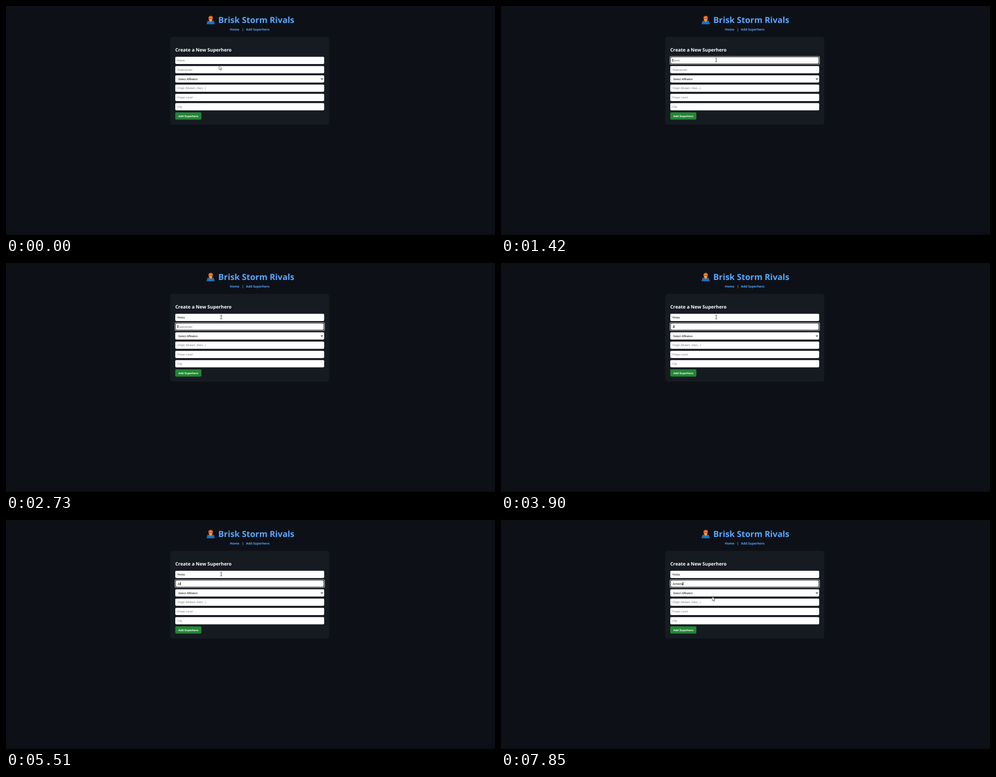
These frames come from a looping animation (1092 by 513 pixels, 8000 ms). An HTML page:

```html
<!DOCTYPE html>
<html lang="en">
<head>
<meta charset="utf-8">
<title>Superhero form</title>
<style>
  html, body { margin: 0; width: 100%; height: 100%; overflow: hidden; background: #0d1117; }
  svg { display: block; width: 1092px; height: 513px; text-rendering: geometricPrecision; }
  .ui { font-family: "Open Sans", "Noto Sans", sans-serif; font-weight: 700; fill: #58a6ff; }
  .form { font: 6.2px "Liberation Sans", Arial, sans-serif; }
  .light { fill: #fff; }
</style>
</head>
<body>
<svg id="stage" viewBox="0 0 1092 513">
  <rect width="1092" height="513" fill="#0d1117"/>
  <rect y="509.5" width="1092" height="3.5" fill="#0a0d12"/>

  <g id="hero">
    <path d="M450 33H464L466 41H448Z" fill="#c8372d"/>
    <path d="M448.3 41Q448 34.5 454 33.4H460Q466 34.5 465.8 41Z" fill="#1673c7"/>
    <path d="M451 41V38M463 41V38" stroke="#0b4f94" stroke-width=".7"/>
    <path d="M454.5 32H459.7V34L457.1 36.3L454.5 34Z" fill="#e08a3c"/>
    <ellipse cx="457" cy="28.3" rx="4.4" ry="5.2" fill="#f9a84b"/>
    <path d="M452.2 28.5Q451.3 22 457.4 22Q463 22.2 461.9 28.5Q460.5 25.6 457.5 25.6Q453.4 25.5 452.2 28.5Z" fill="#e8671b"/>
    <path d="M452.8 27.3H461.3V28.8Q459 30.2 457 28.7Q455 30.2 452.8 28.8Z" fill="#b6452c"/>
  </g>

  <g class="ui">
    <text x="474" y="38.2" font-size="18.8">Brisk Storm Rivals</text>
    <g font-size="7.1">
      <text x="500" y="55.3">Home</text>
      <text x="527" y="55.3" class="light" font-weight="400">|</text>
      <text x="536" y="55.3">Add Superhero</text>
    </g>
  </g>

  <rect x="366.5" y="69" width="355.3" height="196.7" rx="6" fill="#161b22"/>
  <text class="ui light" x="378" y="101.5" font-size="10.4">Create a New Superhero</text>

  <g class="form">
    <g id="ring">
      <rect x="377" y="112.4" width="334.7" height="18.7" rx="3" fill="#fff"/>
      <rect x="378" y="113.3" width="332.7" height="16.9" rx="2.2" fill="#101010"/>
    </g>
    <g id="fields"></g>
    <path d="M703.4 162.2L705.5 164.4L707.6 162.2" fill="none" stroke="#000" stroke-width="1.1"/>
    <g id="spinner">
      <rect x="697" y="201" width="7" height="8" fill="#efefef"/>
      <path d="M699 204L700.5 202.3L702 204ZM699 206L700.5 207.7L702 206Z" fill="#505050"/>
    </g>
    <rect id="caret" width="1" height="7"/>
    <rect x="378" y="238.2" width="58.3" height="16.3" rx="2.4" fill="#238636"/>
    <text class="light" x="384.8" y="248.6" font-weight="700">Add Superhero</text>
  </g>

  <path id="arrow" d="M0 0V9.4L2.2 7.5L3.7 10.8L5.2 10.1L3.8 6.9H6.6Z" fill="#fff" stroke="#222" stroke-width=".7"/>
  <g id="beam" fill="none" stroke="#111">
    <path d="M-2 -4.2H-.6L0 -3.8L.6 -4.2H2M0 -3.8V3.8M-2 4.2H-.6L0 3.8L.6 4.2H2" stroke-width=".85"/>
    <circle id="click" r="5.8" stroke-width=".8"/>
  </g>
</svg>
<script>
const $ = id => document.getElementById(id);
const LOOP = 8000, TOP = 113.7, STEP = 20.75, LEFT = 383;
const hints = ['Name', 'Superpower', 'Select Affiliation', 'Origin (Mutant, Alien...)', 'Power Level', 'City'];
const NAME = 'Norpy';

function add(tag, attrs) {
  const el = document.createElementNS('http://www.w3.org/2000/svg', tag);
  for (const k in attrs) el.setAttribute(k, attrs[k]);
  return $('fields').appendChild(el);
}

const fields = hints.map((hint, i) => {
  const y = TOP + i * STEP;
  const box = add('rect', { x: 378, y, width: 332.5, height: 16.2, rx: 2.3, fill: '#fff' });
  const text = add('text', { x: i === 2 ? 384.6 : LEFT, y: y + 10.4 });
  return { box, text, y, hint };
});

// time, focused field, its text, caret visible
const typing = [
  [0, -1, '', 0], [380, 0, '', 1], [890, 0, '', 0], [1420, 0, '', 1],
  [1540, 0, 'No', 1], [1930, 0, 'Norp', 1], [2180, 0, NAME, 1],
  [2730, 1, '', 1], [3240, 1, '', 0], [3770, 1, '', 1],
  [3900, 1, 'J', 1], [4170, 1, 'Ju', 1], [4450, 1, 'Junp', 1], [4980, 1, 'Junp', 0],
  [5260, 1, 'Jun', 1], [5380, 1, 'Ju', 1], [5900, 1, 'Ju', 0],
  [6050, 1, 'Jum', 1], [6330, 1, 'Jump', 1], [6600, 1, 'Jumpi', 1], [6730, 1, 'Jumpin', 1],
  [6870, 1, 'Jumping', 1], [7400, 1, 'Jumping', 0], [7850, 1, 'Jumping', 1]
];

// time, pointer shape, x, y
const pointer = [
  [0, 'arrow', 475.7, 133.3], [250, 'beam', 482, 120], [380, 'click', 482, 120],
  [500, 'beam', 482, 120], [890, 'beam', 480.5, 121.2], [7270, 'beam', 480.3, 122.5],
  [7400, 'beam', 479, 125], [7540, 'beam', 478.5, 204], [7700, 'beam', 476.8, 180],
  [7850, 'arrow', 471.8, 171.5]
];

const at = (list, t) => list.findLast(s => s[0] <= t);
const show = (el, on) => el.setAttribute('visibility', on ? 'visible' : 'hidden');
const move = (el, x, y) => el.setAttribute('transform', `translate(${x} ${y})`);

function draw(now) {
  const t = now % LOOP;
  const [, focus, typed, caretOn] = at(typing, t);
  const [, shape, px, py] = at(pointer, t);

  fields.forEach((f, i) => {
    const on = i === focus, inset = on ? 1.2 : 0;
    const value = on ? typed : i === 0 && focus === 1 ? NAME : '';
    f.text.textContent = value || f.hint;
    f.text.setAttribute('fill', value || i === 2 ? '#000' : '#757575');
    f.box.setAttribute('x', 378 + inset);
    f.box.setAttribute('y', f.y + inset * .7);
    f.box.setAttribute('width', 332.5 - 2 * inset);
    f.box.setAttribute('height', 16.2 - 1.4 * inset);
  });

  show($('ring'), focus >= 0);
  show($('caret'), caretOn);
  if (focus >= 0) {
    const f = fields[focus];
    const width = typed ? f.text.getComputedTextLength() : 0;
    move($('ring'), 0, focus * STEP);
    move($('caret'), Math.floor(LEFT + width), 118 + focus * 21);
  }

  show($('spinner'), t >= 7540 && t < 7700);
  show($('arrow'), shape === 'arrow');
  show($('beam'), shape !== 'arrow');
  show($('click'), shape === 'click');
  move($(shape === 'arrow' ? 'arrow' : 'beam'), px, py);
  requestAnimationFrame(tick);
}

const tick = () => draw(performance.now());
tick();
</script>
</body>
</html>
```
